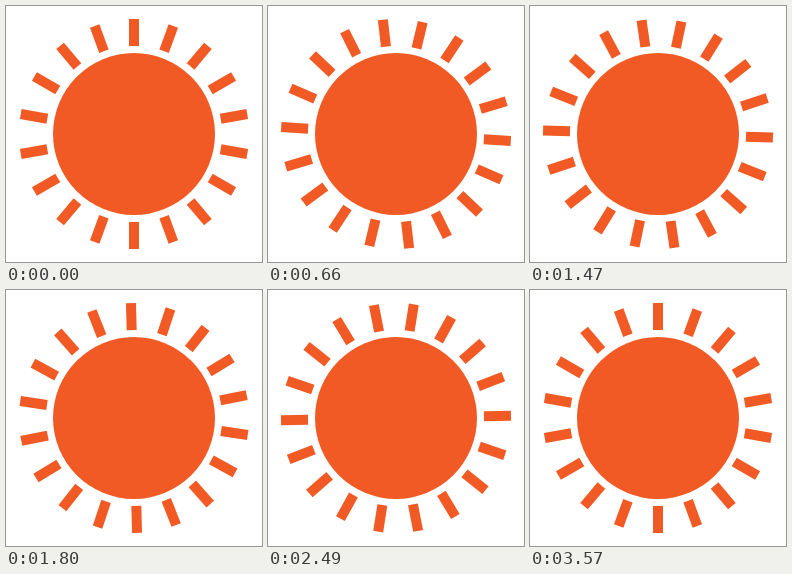
Recreate the animation shown at these times as an HTML page. Size 256 by 256 pixels, loop 3.6 s.

```html
<!DOCTYPE html>
<html lang="en">
<head>
<meta charset="utf-8">
<title>Spinning sun</title>
<style>
  html, body { margin: 0; width: 100%; height: 100%; overflow: hidden; background: #fff; }
  svg { display: block; width: 100vw; height: 100vh; }
</style>
</head>
<body>
<svg viewBox="-128 -128 256 256" fill="#f15a24">
  <circle r="81"/>
  <g id="rays"></g>
</svg>
<script>
  const STEP_MS = 30, STEPS = 120, RAY_COUNT = 18;
  const rays = document.getElementById('rays');

  rays.innerHTML = Array.from({ length: RAY_COUNT }, (_, i) =>
    `<rect x="-5" y="-115" width="10" height="27" transform="rotate(${i * 360 / RAY_COUNT})"/>`
  ).join('');

  // One counter-clockwise turn per loop; the last step coincides with the first.
  function draw() {
    const step = Math.floor(performance.now() / STEP_MS) % STEPS;
    rays.setAttribute('transform', `rotate(${-360 * step / (STEPS - 1)})`);
    requestAnimationFrame(draw);
  }
  draw();
</script>
</body>
</html>
```
